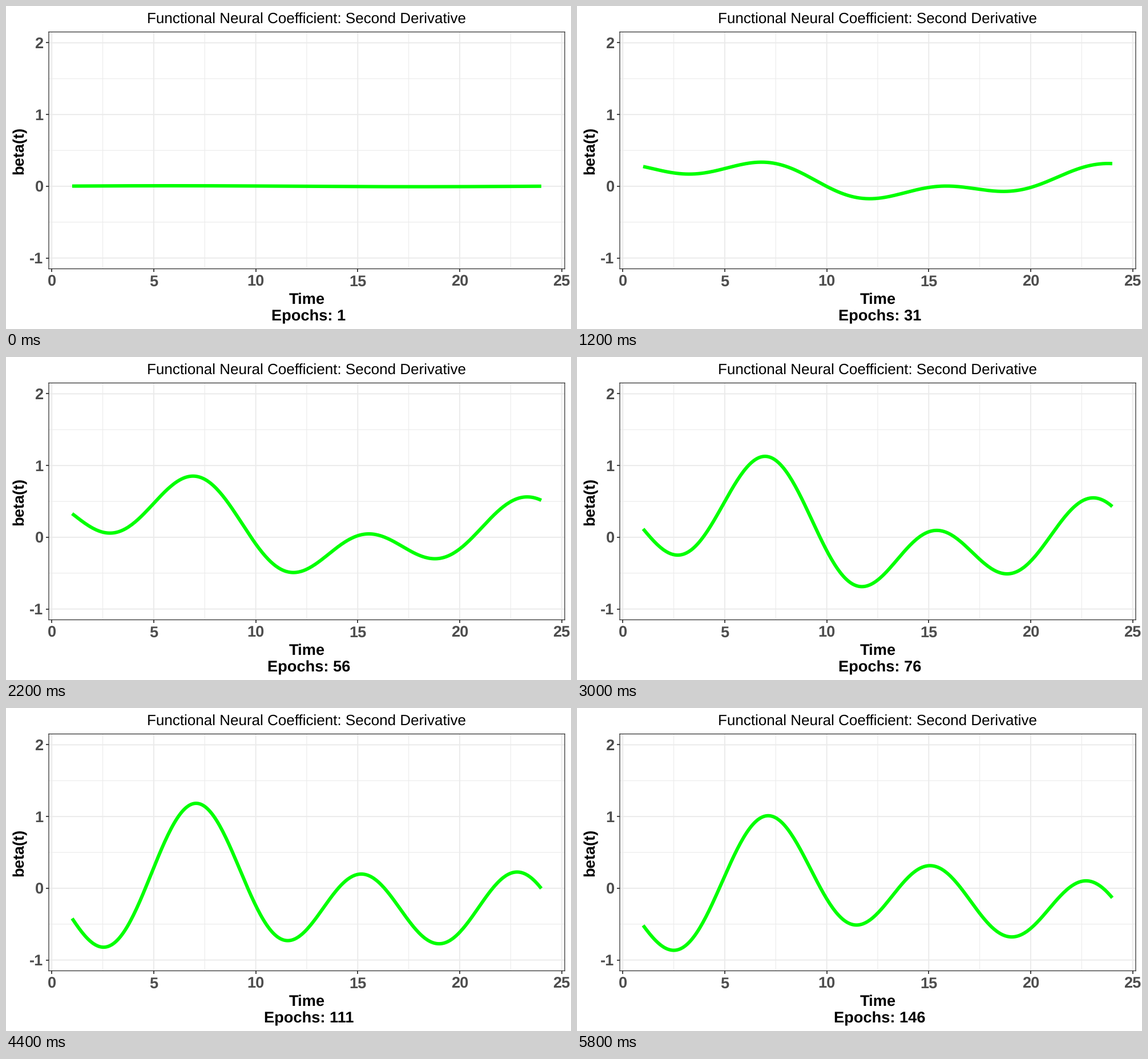
Recreate the animation shown at these times as a matplotlib script. Size 990 by 566 pixels, loop 6000 ms.

```python
import matplotlib.pyplot as plt
import numpy as np
from matplotlib.animation import FuncAnimation

W, H, DPI = 990, 566, 100
PT = 72 / DPI                                   # points per pixel
LEFT, RIGHT, TOP, BOTTOM = 75, 979, 45.5, 460.5  # panel edges in pixels
X0, X_UNIT = 80.2, 35.74
Y0, Y_UNIT = 315.9, 125.7
FRAMES, INTERVAL, EPOCH_STEP = 30, 200, 5
PERIOD = 24
DARK, GREY, GRID, GREEN = "#333333", "#4d4d4d", "#ebebeb", "#00ff00"

plt.rcParams.update({
    "font.family": "Liberation Sans",
    "text.hinting": "none",
    "axes.unicode_minus": False,
})


def hump(epoch, peak, power):
    """Slow rise to 1 at the peak epoch, then a gentle fall."""
    x = epoch / peak
    return (x * np.exp(1 - x)) ** power


def swing(epoch, crossing):
    """Rises first, then swings below zero after the crossing epoch."""
    return np.sin(np.pi * (epoch / crossing) ** 1.1)


def wave(t, k, peak_time):
    return np.cos(2 * np.pi * k * (t - peak_time) / PERIOD)


def beta(t, epoch):
    """Coefficient curve: an offset plus three learned harmonics."""
    warm = 1 - np.exp(-epoch / 20)
    drift = 0.95 * np.exp(-epoch / 42)
    return (warm * (0.008 + 0.14 * swing(epoch, 88))
            + warm * 0.235 * swing(epoch, 97) * wave(t, 1, 0)
            + (0.36 * hump(epoch, 85, 2.6) + 0.007 * (1 - warm)) * wave(t, 1, 6)
            + 0.31 * hump(epoch, 110, 4) * wave(t, 2, 7.25)
            + 0.635 * hump(epoch, 112, 3.1) * wave(t, 3, 6.96 + drift))


fig = plt.figure(figsize=(W / DPI, H / DPI), dpi=DPI, facecolor="white")


def label(x, y, text, px=27.3, color="black", weight="bold", ha="center",
          rotation=0):
    """Text with its baseline at a pixel position."""
    return fig.text(x / W, 1 - y / H, text, fontsize=px * PT, color=color,
                    weight=weight, ha=ha, va="baseline", rotation=rotation,
                    rotation_mode="anchor")


ax = fig.add_axes([LEFT / W, 1 - BOTTOM / H,
                   (RIGHT - LEFT) / W, (BOTTOM - TOP) / H])
ax.set_xlim((LEFT - X0) / X_UNIT, (RIGHT - X0) / X_UNIT)
ax.set_ylim((Y0 - BOTTOM) / Y_UNIT, (Y0 - TOP) / Y_UNIT)
ax.set_axisbelow(True)
ax.set_xticks(range(0, 26, 5))
ax.set_yticks(range(-1, 3))
ax.set_xticks(np.arange(2.5, 25, 5), minor=True)
ax.set_yticks(np.arange(-0.5, 2, 1), minor=True)
ax.tick_params(which="major", length=5 * PT, width=1.8 * PT, color=DARK,
               labelbottom=False, labelleft=False)
ax.tick_params(which="minor", length=0)
ax.grid(which="minor", color=GRID, lw=1.1 * PT, snap=False)
ax.grid(which="major", color=GRID, lw=2 * PT, snap=False)
for spine in ax.spines.values():
    spine.set(color=DARK, linewidth=1.3 * PT, snap=False)

for v in range(0, 26, 5):
    label(X0 + v * X_UNIT, 490.7, str(v), color=GREY)
for v in range(-1, 3):
    label(65.6, Y0 - v * Y_UNIT + 9.8, str(v), color=GREY, ha="right")

label(526.5, 30.7, "Functional Neural Coefficient: Second Derivative",
      px=26, weight="normal")
label(30.9, 253, "beta(t)", rotation=90)
label(526.8, 521.3, "Time")
counter = label(530.4, 551.2, "")

times = np.linspace(1, 24, 300)
curve, = ax.plot([], [], color=GREEN, lw=6 * PT,
                 solid_capstyle="butt", solid_joinstyle="round")


def update(i):
    epoch = 1 + EPOCH_STEP * i
    curve.set_data(times, beta(times, epoch))
    counter.set_text(f"Epochs: {epoch}")
    return curve, counter


anim = FuncAnimation(fig, update, frames=FRAMES, interval=INTERVAL,
                     repeat=True, repeat_delay=0)
plt.show()
```
